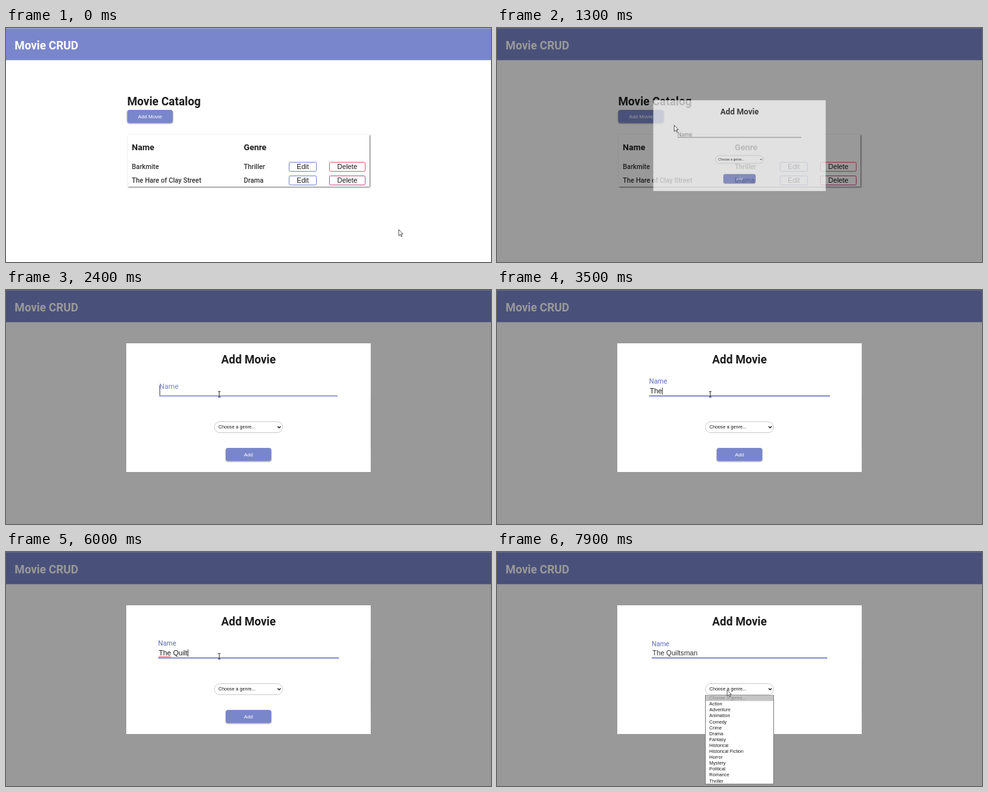
Recreate the animation shown at these times as an HTML page. Size 746 px wide and 360 px high, loop 8000 ms.

```html
<!DOCTYPE html>
<html lang="en">
<head>
<meta charset="utf-8">
<title>Movie CRUD</title>
<style>
  html, body { margin: 0; width: 100%; height: 100%; overflow: hidden; background: #fff; }
  svg { display: block; width: 746px; height: 360px; }
  text { font-family: Roboto, sans-serif; fill: #1c1c1c; white-space: pre; }
  .title { font-size: 17.5px; font-weight: 700; }
  .head { font-size: 13px; font-weight: 700; }
  .cell { font-size: 10.3px; font-weight: 500; fill: #333; }
  .arial { font-family: "Liberation Sans", Arial, sans-serif; }
  .small { font-size: 10.7px; }
  .cta { font-size: 7.85px; fill: #fff; }
  .option { font-size: 7.15px; }
  .mid { text-anchor: middle; }
  .raised { filter: drop-shadow(0.5px 1px 0.8px rgba(0, 0, 0, .45)); }
  .card { filter: drop-shadow(1.2px 1.2px 0.8px rgba(0, 0, 0, .6)); }
</style>
</head>
<body>
<svg viewBox="0 0 746 360">
  <rect width="746" height="360" fill="#fff"/>
  <rect width="746" height="49.5" fill="#7986cb"/>
  <rect width="746" height="1" fill="#a4add8"/>
  <text class="title" x="13.3" y="33" style="fill:#fff">Movie CRUD</text>
  <text class="title" x="186.5" y="119">Movie Catalog</text>
  <g id="addMovie">
    <rect class="raised" x="186.5" y="126" width="70" height="20" rx="3.5" fill="#7986cb"/>
    <text class="arial cta mid" x="221.5" y="139">Add Movie</text>
  </g>
  <rect class="card" x="187" y="164" width="372" height="80" fill="#fff"/>
  <text class="head" x="193.5" y="188">Name</text>
  <text class="head" x="365.8" y="188">Genre</text>
  <g id="rows"></g>

  <rect id="shade" width="746" height="360" fill="#000" opacity=".4"/>

  <g id="modal">
    <rect x="185" y="82" width="376" height="198" fill="#fff"/>
    <text class="title mid" x="373" y="112.7">Add Movie</text>
    <g id="field">
      <text id="label" x="238">Name</text>
      <text id="typed" class="arial" x="239" y="159.2" font-size="10.68"></text>
      <path id="spelling" d="M239 161h18" stroke="#f0505c" stroke-width="1"/>
      <path id="line" d="M238 163H508" stroke-width="1.6"/>
      <path id="caret" stroke="#333" stroke-width=".9"/>
    </g>
    <rect x="320.5" y="202.5" width="105" height="17" rx="8.5" fill="#fff" stroke="#c8c8c8" stroke-width=".9"/>
    <text class="arial" font-size="7.2" x="326.7" y="213.3">Choose a genre...</text>
    <path d="M417.8 209.8l2.3 2.3 2.3-2.3" fill="none" stroke="#111" stroke-width="1.3"/>
    <rect class="raised" x="338" y="243" width="70" height="20" rx="3.5" fill="#7986cb"/>
    <text class="arial cta mid" x="373" y="256">Add</text>
  </g>

  <g id="menu">
    <rect x="320.5" y="220.5" width="105" height="136.5" fill="#fff" stroke="#777" stroke-width=".9"/>
    <rect x="321" y="220.5" width="104" height="8.8" fill="#c6c6c6"/>
  </g>

  <g id="pointer">
    <path id="arrow" d="M0 0V9.6L2.2 7.6 3.9 11 5.3 10.3 3.7 7H6.5Z" fill="#fff" stroke="#333" stroke-width=".8"/>
    <path id="hand" d="M0 .5Q1-.5 2 .5V4L6.2 5.2Q7 5.6 6.8 7L6 11H1L-2 7Q-2 5.4 0 6.8Z" fill="#fff" stroke="#333" stroke-width=".8"/>
    <path id="beam" d="M-2-4.3H2M0-4.3V4.3M-2 4.3H2" fill="none" stroke="#333" stroke-width="1"/>
  </g>
</svg>
<script>
const LOOP = 8000, STEP = 100;
const NAME = "The Quiltsman";
const KEY_TIMES = [3300, 3400, 3500, 3700, 4500, 4800, 5400, 5900, 6000, 6200, 6400, 6500, 6600];
const PRESS = 1200, OPEN = 1220, FOCUS = 2300, SPELL = 4000, LEAVE = 7100, SELECT = 7600;
const MOVIES = [["Barkmite", "Thriller"], ["The Hare of Clay Street", "Drama"]];
const GENRES = ["Choose a genre...", "Action", "Adventure", "Animation", "Comedy", "Crime", "Drama",
  "Fantasy", "Historical", "Historical Fiction", "Horror", "Mystery", "Political", "Romance", "Thriller"];
// time, x, y of the pointer
const PATH = [
  [0, 604, 310], [600, 540, 279], [700, 540, 279], [1100, 245, 135], [1200, 245, 135],
  [1300, 272.5, 149.5], [1600, 318, 178], [1700, 318, 178], [2200, 328, 160.5],
  [LEAVE, 328, 160.5], [7500, 354, 212], [LOOP, 354, 212]
];

const $ = id => document.getElementById(id);
const clamp = v => Math.min(1, Math.max(0, v));
const mix = (a, b, p) => a + (b - a) * p;
const easeOut = p => 1 - (1 - p) ** 2;
const progress = (t, start, length) => clamp((t - start) / length);
const show = (id, on) => $(id).setAttribute("visibility", on ? "visible" : "hidden");
const set = (id, attrs) => {
  for (const key in attrs) $(id).setAttribute(key, attrs[key]);
};
const scaleAt = (x, y, s) => `translate(${x} ${y}) scale(${s}) translate(${-x} ${-y})`;

const button = (x, y, width, color, text) =>
  `<rect x="${x}" y="${y}" width="${width}" height="14" rx="1.8" fill="#fff" stroke="${color}"/>
   <text class="arial small mid" x="${x + width / 2}" y="${y + 10.8}">${text}</text>`;

$("rows").innerHTML = MOVIES.map(([name, genre], i) => {
  const y = 206.5 + i * 21;
  return `<text class="cell" x="193.6" y="${y + 10.6}">${name}</text>
    <text class="cell" x="365.8" y="${y + 10.6}">${genre}</text>` +
    button(435.5, y, 42, "#7986cb", "Edit") + button(497.5, y, 55, i ? "#cf4a86" : "#ea5a6c", "Delete");
}).join("");

$("menu").innerHTML += GENRES.map((genre, i) =>
  `<text class="arial option" x="326.6" y="${227.1 + i * 9.1}" ${i ? "" : 'style="fill:#8a8a8a"'}>${genre}</text>`
).join("");

function pointerAt(t) {
  const i = PATH.findIndex(point => point[0] > t);
  const [t0, x0, y0] = PATH[i - 1], [t1, x1, y1] = PATH[i];
  const p = (t - t0) / (t1 - t0);
  return [mix(x0, x1, p), mix(y0, y1, p)];
}

function drawPointer(t, open) {
  const [x, y] = pointerAt(t);
  const hand = !open && x < 257 && y < 149;
  const beam = open && t > 1700 && x > 238 && x < 508 && y > 146 && y < 165;
  set("pointer", { transform: `translate(${x} ${y})` });
  show("hand", hand);
  show("beam", beam);
  show("arrow", !hand && !beam);
}

function drawField(t) {
  const float = easeOut(progress(t, FOCUS, 300));
  const focus = float - easeOut(progress(t, SELECT, 200));
  const active = t > FOCUS && t < SELECT;
  const count = KEY_TIMES.filter(time => time <= t).length;
  const accent = t < FOCUS + STEP ? "#8a8a8a" : t < 2600 ? "#7986cb" : "#5f6dc2";

  set("field", { transform: scaleAt(373, 163, 1 + .03 * focus) });
  set("label", { y: mix(161, 144.5, float), "font-size": mix(12, 10.15, float) });
  $("label").style.fill = accent;
  set("line", { stroke: accent });

  $("typed").textContent = NAME.slice(0, count);
  $("typed").style.fill = active ? "#1c1c1c" : "#333";
  const end = 239.4 + (count ? $("typed").getComputedTextLength() : 0);
  set("caret", { d: count ? `M${end} 150.3V161` : `M${end - .5} 147V162.3` });
  $("caret").style.display = active && t < LEAVE ? "" : "none";
  $("spelling").style.display = active && t >= SPELL ? "" : "none";
}

function draw(t) {
  const open = t > OPEN;
  const grow = easeOut(progress(t, OPEN, 175));
  set("addMovie", { transform: `translate(0 ${t === PRESS ? 2.3 : 0})` });
  show("shade", open);
  set("modal", { transform: scaleAt(373, 181, grow), opacity: grow });
  show("menu", t >= SELECT);
  drawField(t);
  drawPointer(t, open);
}

const start = performance.now();
function tick() {
  const t = (performance.now() - start) % LOOP;
  draw(Math.floor(t / STEP) * STEP);
  requestAnimationFrame(tick);
}
tick();
</script>
</body>
</html>
```
